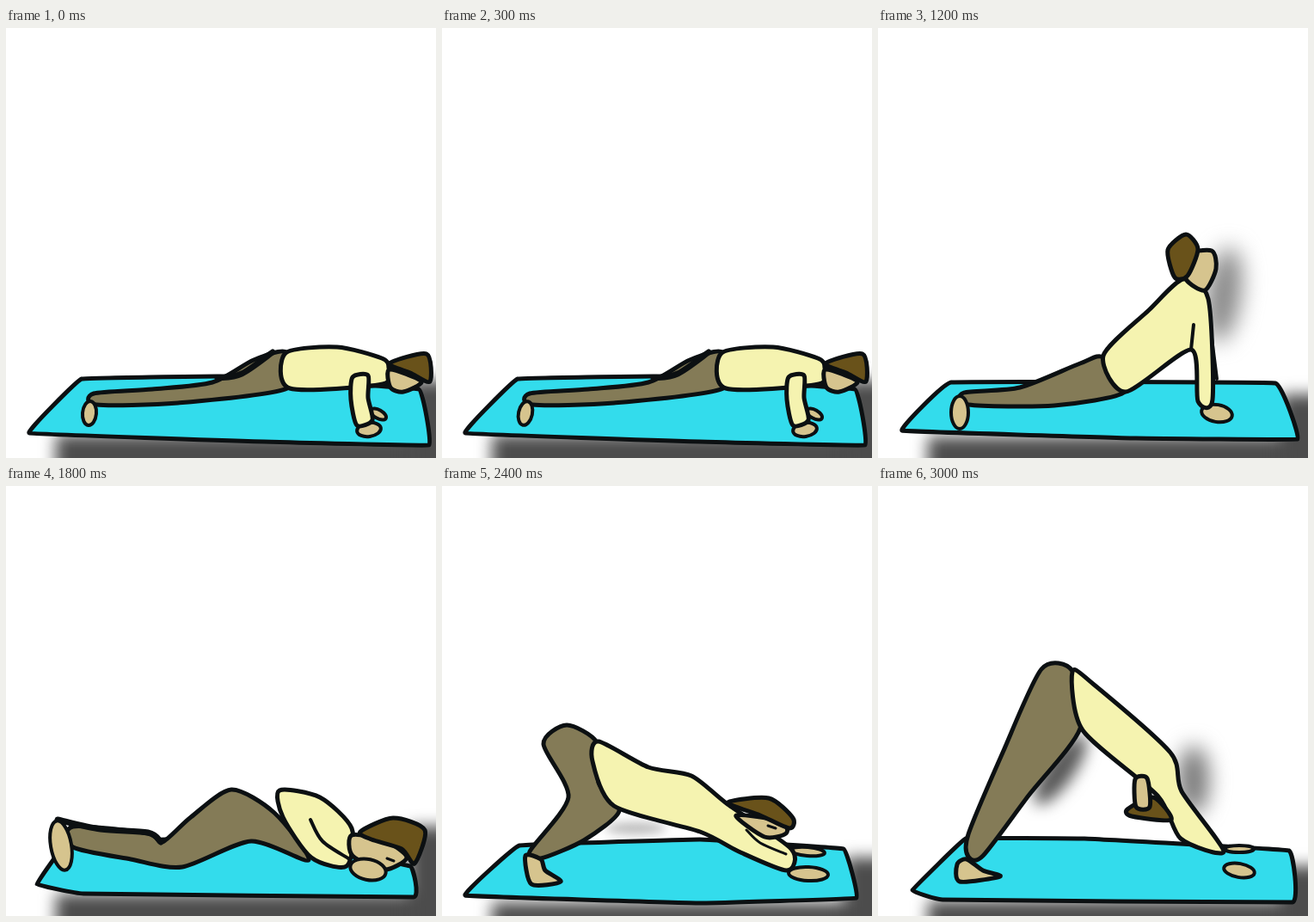
An HTML page with a canvas that plays this animation: 500 by 500 pixels, repeating every 3600 ms.

```html
<!DOCTYPE html>
<html lang="en">
<head>
<meta charset="utf-8">
<title>Yoga sequence</title>
<style>
html, body { margin: 0; width: 100%; height: 100%; overflow: hidden; background: #fff; }
canvas { display: block; width: 100vmin; height: 100vmin; }
</style>
</head>
<body>
<canvas width="500" height="500"></canvas>
<script>
const ctx = document.querySelector('canvas').getContext('2d');
const LOOP = 3600;
const INK = '#0c1012', MAT = '#33dcec', PANTS = '#847b57', SHIRT = '#f5f3b0', SKIN = '#d6c48e', HAIR = '#69521a';

// Traces a rounded curve through "x y x y ..."; bend 0 gives straight edges.
function trace(text, closed, bend) {
  const points = text.match(/\d+ \d+/g).map(pair => pair.split(' ').map(Number));
  const last = points.length - 1;
  const at = i => points.at(closed ? i % points.length : Math.max(0, Math.min(last, i)));
  ctx.beginPath();
  ctx.moveTo(...points[0]);
  for (let i = 0; i < last + closed; i++) {
    const [a, b, c, d] = [at(i - 1), at(i), at(i + 1), at(i + 2)];
    ctx.bezierCurveTo(b[0] + (c[0] - a[0]) * bend, b[1] + (c[1] - a[1]) * bend,
      c[0] - (d[0] - b[0]) * bend, c[1] - (d[1] - b[1]) * bend, c[0], c[1]);
  }
  if (closed) ctx.closePath();
}

function paint(color, width = 4) {
  ctx.fillStyle = color;
  ctx.fill();
  ctx.lineWidth = width;
  ctx.stroke();
}

function shape(color, points, bend = 0.13) {
  trace(points, true, bend);
  paint(color, 5);
}

function line(points, width = 4) {
  trace(points, false, 0.16);
  ctx.lineWidth = width;
  ctx.stroke();
}

function oval(x, y, rx, ry, degrees) {
  ctx.beginPath();
  ctx.ellipse(x, y, rx, ry, degrees * Math.PI / 180, 0, 2 * Math.PI);
}

function limbEnd(...ellipse) {
  oval(...ellipse);
  paint(SKIN);
}

function shade(color, blur, ...ellipse) {
  ctx.filter = `blur(${blur}px)`;
  ctx.fillStyle = color;
  oval(...ellipse);
  ctx.fill();
  ctx.filter = 'none';
}

function mat(shadowTop, shadowLine, corners) {
  ctx.filter = 'blur(9px)';
  ctx.fillStyle = '#4c4c4c';
  ctx.fillRect(58, shadowLine, 500, 90);
  ctx.fillRect(468, shadowTop, 90, 150);
  ctx.filter = 'none';
  shape(MAT, corners, 0.02);
}

function plank(footTilt) {
  mat(410, 473, '27 471 88 408 250 405 480 420 492 485 300 481');
  shape(PANTS, '102 425 170 420 240 412 288 386 326 377 327 419 200 436 105 438');
  line('246 407 274 402 310 377', 7);
  limbEnd(97, 448, 8, 14, footTilt);
  shape(SHIRT, '325 378 385 371 437 384 445 395 438 414 330 419');
  limbEnd(433, 449, 10, 5, 30);
  limbEnd(422, 467, 14, 8, -8);
  shape(SHIRT, '403 406 421 404 421 430 426 456 408 462 401 432');
  shape(SKIN, '446 397 483 411 462 423 447 418');
  shape(HAIR, '446 390 489 379 493 411 470 401');
}

function kneesDown(footTilt) {
  mat(396, 474, '36 463 72 415 300 408 470 442 474 478 90 474');
  shape(PANTS, '78 396 165 404 182 414 215 385 262 353 312 380 352 435 285 413 205 443 145 434 78 420');
  line('60 388 110 399 165 403 180 414', 7);
  limbEnd(64, 418, 12, 29, footTilt);
  shape(SHIRT, '318 354 365 362 402 398 396 442 355 432 322 385');
  line('354 388 368 413 398 433');
  shape(SKIN, '402 406 440 412 466 432 440 446 403 430');
  limbEnd(421, 446, 21, 12, 12);
  shape(HAIR, '412 402 450 386 487 400 475 439 460 422 425 411');
  line('443 433 451 436', 3);
}

function upwardDog() {
  shade('#888', 13, 402, 310, 20, 55, 8);
  mat(426, 475, '28 468 85 412 462 413 488 478 300 477');
  shape(PANTS, '100 424 165 418 235 390 262 383 287 423 205 439 105 438');
  limbEnd(95, 447, 10, 19, 0);
  line('386 345 394 408');
  limbEnd(394, 448, 18, 10, 10);
  shape(SHIRT, '262 381 315 328 355 292 384 315 389 432 372 434 364 374 288 423');
  line('364 374 367 345');
  shape(SKIN, '357 264 388 259 393 280 380 305 358 292');
  shape(HAIR, '337 258 358 240 372 257 360 288 345 290');
}

function puppy() {
  shade('#bbb', 6, 225, 398, 35, 7, 0);
  mat(432, 484, '27 476 90 418 300 411 467 422 482 479 300 485');
  shape(PANTS, '118 300 145 278 180 298 182 345 206 378 165 412 115 433 102 425 147 362');
  shape(SKIN, '97 430 115 434 120 447 138 460 104 463');
  limbEnd(425, 425, 20, 5, 5);
  limbEnd(426, 451, 23, 8, 3);
  shape(SHIRT, '182 297 240 327 290 337 332 370 406 422 401 447 345 425 300 402 200 372 175 320');
  shape(SKIN, '342 383 395 390 400 404 375 408');
  line('354 400 370 415 400 428', 3);
  shape(HAIR, '332 368 380 363 408 386 404 398 370 383');
  line('379 395 388 398', 3);
}

function downwardDog() {
  shade('#555', 9, 212, 330, 16, 48, 35);
  shade('#777', 12, 367, 342, 18, 40, 0);
  mat(442, 482, '40 470 102 410 240 410 478 424 482 484 75 481');
  shape(PANTS, '190 213 226 215 235 282 175 360 122 430 105 431 105 405 145 310');
  shape(SKIN, '92 440 103 434 122 447 142 454 95 460');
  limbEnd(420, 422, 17, 4, 0);
  limbEnd(420, 447, 18, 8, 10);
  shape(SHIRT, '226 216 250 230 340 310 353 355 402 425 352 410 325 360 238 284');
  shape(HAIR, '290 376 320 362 341 388 295 384');
  shape(SKIN, '299 341 313 340 316 373 300 373');
}

const timeline = [
  [0, plank, 5],
  [300, plank, 12],
  [600, kneesDown, -10],
  [1200, upwardDog],
  [1800, kneesDown, -10],
  [2100, kneesDown, -6],
  [2400, puppy],
  [3000, downwardDog]
];

function render(time) {
  const [, pose, tilt] = timeline.findLast(([start]) => start <= time);
  ctx.fillStyle = '#fff';
  ctx.fillRect(0, 0, 500, 500);
  ctx.strokeStyle = INK;
  ctx.lineJoin = ctx.lineCap = 'round';
  pose(tilt);
}

const begin = performance.now();
function tick() {
  render((performance.now() - begin) % LOOP);
  requestAnimationFrame(tick);
}
tick();
</script>
</body>
</html>
```
